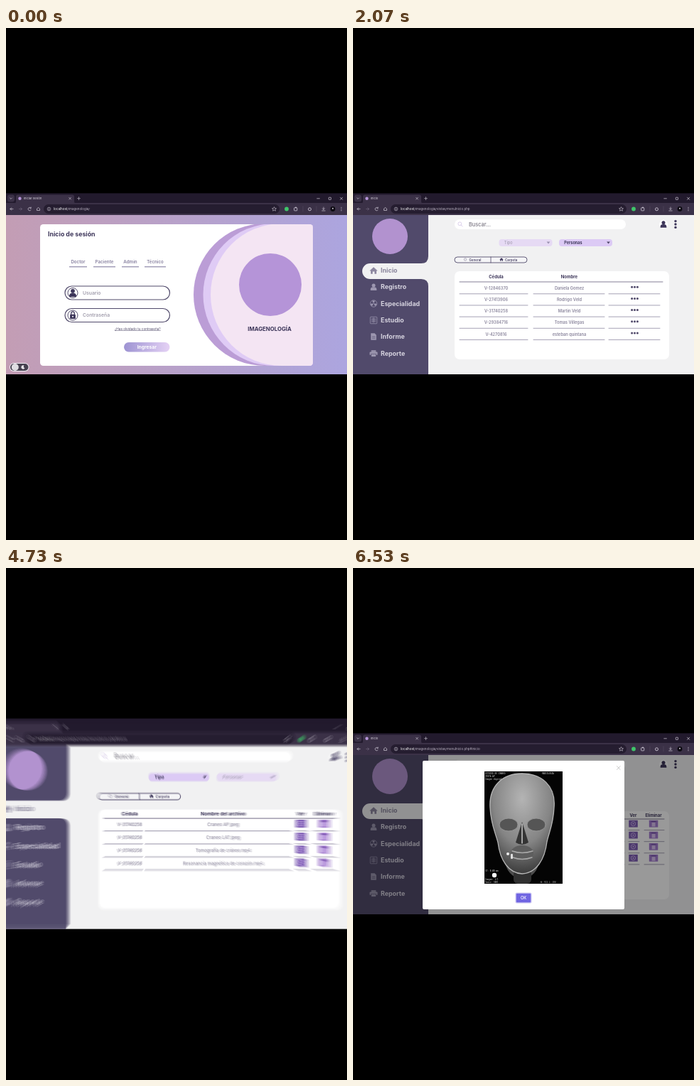
An HTML page for the animation above (7930 ms loop, 480 by 720 pixels).

```html
<!DOCTYPE html>
<html lang="es">
<head>
<meta charset="utf-8">
<title>Imagenología</title>
<style>
  html, body { margin: 0; width: 100%; height: 100%; overflow: hidden; background: #000; }
  svg { display: block; width: 100%; height: 100%; font-family: Inter, sans-serif; }
</style>
</head>
<body>
<svg id="stage" viewBox="0 0 480 720"></svg>
<script>
const INK = '#3d365a', MID = '#514a6b', GREY = '#8a859c', LILAC = '#b594d8';
const TOP = 263, BOTTOM = 487;

// Drawing helpers: every one returns SVG markup
const text = (x, y, s, size, fill, weight = 700, more = '') =>
  `<text x="${x}" y="${y}" font-size="${size}" fill="${fill}" font-weight="${weight}" ${more}>${s}</text>`;
const mid = (x, y, s, size, fill, weight = 700) => text(x, y, s, size, fill, weight, 'text-anchor="middle"');
const box = (x, y, w, h, fill, r = 0, more = '') =>
  `<rect x="${x}" y="${y}" width="${w}" height="${h}" rx="${r}" fill="${fill}" ${more}/>`;
const page = (fill, more) => box(0, TOP, 480, BOTTOM - TOP, fill, 0, more);
const disc = (x, y, r, fill, more = '') => `<circle cx="${x}" cy="${y}" r="${r}" fill="${fill}" ${more}/>`;
const oval = (x, y, rx, ry, fill, more = '') =>
  `<ellipse cx="${x}" cy="${y}" rx="${rx}" ry="${ry}" fill="${fill}" ${more}/>`;
const shape = (d, fill, more = '') => `<path d="${d}" fill="${fill}" ${more}/>`;
const line = (d, color, w = 0.8) => shape(d, 'none', `stroke="${color}" stroke-width="${w}" stroke-linecap="round"`);
const at = (x, y, k, s) => `<g transform="translate(${x} ${y}) scale(${k})">${s}</g>`;

const person = c => disc(0, -2.3, 2.5, c) + shape('M-4.3 4.8V3.2A4.3 3.2 0 0 1 4.3 3.2V4.8Z', c);
const house = c => shape('M0-5 6 .6H4.2V5H1.4V1.5H-1.4V5H-4.2V.6H-6Z', c);
const caret = (x, y, c) => shape(`M${x - 2.4} ${y - 1.3}h4.8l-2.4 3z`, c);
const icons = [
  house,
  person,
  c => disc(0, 0, 5, 'none', `stroke="${c}" stroke-width=".8"`) +
    [0, 120, 240].map(a => shape('M-.8 1.2-2 4A4.3 4.3 0 0 0 2 4L.8 1.2Z', c, `transform="rotate(${a + 60})"`)).join('') + disc(0, 0, .8, c),
  c => box(-5, -5, 10, 10, 'none', 1, `stroke="${c}" stroke-width=".8"`) + line('M0-3.5V3.5M-3-2Q0-3 3-2M-3 0Q0-1 3 0M-3 2Q0 1 3 2', c),
  c => shape('M-4-5H1.5L4-2.5V5H-4Z', c) + line('M-2 0H2M-2 2.3H2', MID, .7),
  c => box(-3.5, -4.5, 7, 2.5, c) + box(-5.8, -2, 11.6, 4.5, c, 1) + box(-3.5, .8, 7, 4.2, c, 0, `stroke="${MID}" stroke-width=".7"`),
];

function browser(title, path) {
  const c = '#cfc9d6';
  return box(0, 232.4, 480, 15, '#221a2d') + box(0, 246, 480, 17, '#3b3147') +
    box(2, 234.5, 10, 10, '#3b3147', 3) + line('M5.6 239 7 240.4 8.4 239', c, .7) +
    shape('M12 247Q14 246 14 244V237Q14 234.5 17 234.5H93Q96 234.5 96 237V244Q96 246 98 247Z', '#3b3147') +
    disc(19.5, 239.8, 2.2, LILAC) + text(25, 241.3, title, 4, '#ddd8e2', 400) +
    line('M88.7 238.3l2.8 2.8m0-2.8l-2.8 2.8M100.5 239.7h4m-2-2v4', c, .6) +
    line('M437.8 239.8h3.6M470.5 238.2l3.2 3.2m0-3.2l-3.2 3.2', c, .7) +
    box(454.3, 238.2, 3.2, 3.2, 'none', .5, `stroke="${c}" stroke-width=".7"`) +
    line('M10 254.5H6m1.8-1.8L6 254.5l1.8 1.8M35 253.2A2.2 2.2 0 1 0 35 256M35.2 252v1.4h-1.4', c, .7) +
    line('M18.5 254.5h4m-1.8-1.8 1.8 1.8-1.8 1.8', '#6e647a', .7) +
    at(45.5, 254.5, .4, shape('M0-5 5-1V5H-5V-1Z', 'none', `stroke="${c}" stroke-width="1.8"`)) +
    box(53, 248, 332, 13, '#251d30', 6.5) +
    disc(60.5, 254.5, 2.3, 'none', `stroke="${c}" stroke-width=".6"`) + line('M60.5 254.4v1.2M60.5 253.2v.1', c, .6) +
    text(67, 256, `<tspan fill="#fff">localhost</tspan>${path}`, 4.5, '#bcb5c4', 400) +
    shape('M377.5 251.6l.9 1.9 2.1.2-1.6 1.4.5 2.1-1.9-1.1-1.9 1.1.5-2.1-1.6-1.4 2.1-.2z', 'none', `stroke="${c}" stroke-width=".6"`) +
    disc(395, 254.5, 2.9, '#3fc66a') +
    box(405.6, 252.7, 4.2, 4.2, 'none', .7, `stroke="${c}" stroke-width=".8"`) + disc(408, 252.4, .9, c) +
    line('M418 251v7M437 251v7', '#5b5067', .5) +
    disc(427.5, 254.8, 2, 'none', `stroke="${c}" stroke-width=".9"`) +
    line('M447 252v3.2m-1.5-1.4 1.5 1.5 1.5-1.5M444.8 257h4.4', c, .7) +
    disc(460, 254.5, 3.4, '#0d0a12') + disc(460, 253.7, 1, c) +
    [252.3, 254.5, 256.7].map(y => disc(472, y, .6, c)).join('');
}

function login() {
  const field = (y, label, icon) =>
    box(83, y - 9.5, 147.5, 19, '#fff', 9.5, `stroke="${MID}" stroke-width="1.2"`) +
    disc(94, y, 7, '#fff', `stroke="${MID}" stroke-width="1"`) + at(94, y, 1.15, icon) +
    text(108, y + 2.2, label, 6.8, '#a19dac', 600);
  const lock = box(-3.4, -1, 6.8, 5.3, INK, .8) + line('M-2-1V-2.5A2 2 0 0 1 2-2.5V-1', INK, 1.1) + disc(0, 1.5, .9, '#fff');
  const roles = [['Doctor', 89, 114], ['Paciente', 123, 154], ['Admin', 163, 187], ['Técnico', 195, 225]];
  return browser('Iniciar Sesión', '/imagenologia/') +
    page('url(#page)') + box(48, 276, 384, 199, '#fff', 4.5) +
    `<g clip-path="url(#card)">${box(264, 275, 260, 200, '#bb9dd6', 100)}` +
    `${box(277.5, 275, 260, 200, '#dfcbf5', 100)}${box(288, 275, 260, 200, '#f4e5f3', 100)}</g>` +
    disc(372, 361, 44, LILAC) + mid(371, 425.5, 'IMAGENOLOGÍA', 7.8, INK) +
    text(59, 293, 'Inicio de sesión', 8.8, INK) +
    roles.map(([s, a, b]) => mid((a + b) / 2, 331.2, s, 6.1, '#928ca8') + box(a, 335.2, b - a, 1.2, '#8d87a8')).join('') +
    field(372.5, 'Usuario', person(INK)) + field(404, 'Contraseña', lock) +
    text(153, 424.5, '¿Has olvidado tu contraseña?', 4.65, MID, 400, 'text-decoration="underline"') +
    box(166, 442, 64.5, 13.5, 'url(#enter)', 6.7) + mid(198.3, 451.2, 'Ingresar', 6.7, '#fff') +
    box(5, 471, 27.5, 12, '#f2eff5', 6) + box(6, 472, 25.5, 10, '#46404f', 5) + disc(12.8, 477, 5, '#e0dee3') +
    shape('M25.5 474.6A2.7 2.7 0 1 0 26.4 478.5 2.4 2.4 0 0 1 25.5 474.6Z', '#e6e4e8');
}

// Sidebar with one highlighted entry that opens into the page
function sidebar(active, top, bottom, rows) {
  const names = ['Inicio', 'Registro', 'Especialidad', 'Estudio', 'Informe', 'Reporte'];
  const r = Math.min(17, (bottom - top) / 2);
  return page('#f1f1f2') +
    shape(`M0 ${TOP}H106V${top - 10}Q106 ${top} 96 ${top}H${13 + r}A${r} ${r} 0 0 0 13 ${top + r}V${bottom - r}` +
      `A${r} ${r} 0 0 0 ${13 + r} ${bottom}H96Q106 ${bottom} 106 ${bottom + 10}V${BOTTOM}H0Z`, MID) +
    disc(52, 293, 25, '#b292cf') +
    names.map((s, i) => at(29, rows[i], i == 1 ? 1 : .95, icons[i](i == active ? '#8d87a0' : '#9d97b0')) +
      text(39, rows[i] + 3.1, s, 8.9, i == active ? GREY : '#d6d3df')).join('');
}

function home(path, byPerson, table) {
  const select = (x, s, on) => box(x, 297, 75, 10, on ? '#dccaf5' : '#e6daf4', 4) +
    text(x + 7.3, 304, s, 5.5, on ? INK : '#a79fb5', on ? 700 : 500) + caret(x + 69.5, 301.8, on ? MID : '#9b92b0');
  return browser('Inicio', path) + sidebar(0, 331, 353, [341, 364.3, 387.5, 411, 434, 457.5]) +
    box(143, 269.3, 241, 13.7, '#fff', 6.8) +
    disc(150.3, 275.3, 2.4, 'none', 'stroke="#d3c5e8" stroke-width=".8"') + line('M152.1 277.1l2 2', '#d3c5e8') +
    text(163, 278.8, 'Buscar...', 7.4, '#7b7783', 500) +
    disc(437, 276, 6, '#fff') + at(437, 276, 1, person(INK)) +
    [271.6, 276, 280.4].map(y => disc(454, y, 1.7, INK)).join('') +
    select(205.5, 'Tipo', !byPerson) + select(290, 'Personas', byPerson) +
    box(143, 322, 102, 8, '#f5f5f7', 4, `stroke="${MID}" stroke-width=".9"`) + line('M194 322v8', MID) +
    disc(158, 325.5, 1.7, 'none', `stroke="${GREY}" stroke-width=".6"`) + text(163.5, 327.6, 'General', 4.5, MID, 600) +
    at(209, 325.5, .45, house(INK)) + text(214, 327.6, 'Carpeta', 4.5, MID, 600) +
    box(143, 342, 302, 124, '#fff', 7) + table;
}

const rules = (y, spans, c, w) => spans.map(([a, b]) => line(`M${a} ${y}H${b}`, c, w)).join('');

function people() {
  const rows = [['V-12846370', 'Daniela Gomez'], ['V-27413906', 'Rodrigo Veld'], ['V-31740258', 'Martin Veld'],
    ['V-29384716', 'Tomas Villegas'], ['V-4270816', 'esteban quintana']];
  const cols = [[150, 246], [254, 354], [360, 432]];
  return home('/imagenologia/vistas/menuInicio.php', true,
    mid(201.5, 352, 'Cédula', 6, INK) + mid(304.5, 352, 'Nombre', 6, INK) + rules(357, [[150, 436]], '#77718c', .9) +
    rows.map(([id, name], i) => {
      const y = 366 + i * 16.15;
      return mid(201.5, y + 2, id, 5.6, GREY, 600) + mid(304.5, y + 2, name, 5.7, GREY, 600) +
        [392.6, 396.5, 400.4].map(x => disc(x, y - 1.7, 1.5, MID)).join('') + rules(y + 7.8, cols, '#8f8aa2', .8);
    }).join(''));
}

function files() {
  const rows = ['Craneo AP.jpeg', 'Craneo LAT.jpeg', 'Tomografía de cráneo.mp4', 'Resonancia magnética de corazón.mp4'];
  const heads = [[182, 'Cédula'], [298, 'Nombre del archivo'], [394.5, 'Ver'], [423, 'Eliminar']];
  return home('/imagenologia/vistas/menuInicio.php#inicio', false,
    heads.map(([x, s]) => mid(x, 349.6, s, 5.9, INK)).join('') + rules(353, [[150, 438]], '#77718c', .9) +
    rows.map((s, i) => {
      const y = 361 + i * 16.1;
      return mid(182, y + 1.6, 'V-31740258', 5.2, GREY, 600) + mid(298, y + 1.6, s, 5.3, GREY, 500) +
        box(388.3, y - 6.3, 12.5, 9.8, '#7d5bb4', .6) + disc(394.5, y - 1.4, 3.1, 'none', 'stroke="#d4bdf0" stroke-width=".9"') + disc(394.5, y - 1.4, 1, '#d4bdf0') +
        box(416.8, y - 6.3, 12.5, 9.8, '#a37bd0', .6) + box(420.7, y - 3, 4.8, 5.4, '#d9c3f0', .5) + line(`M420 ${y - 4.4}h6.2`, '#5f3f94') +
        rules(y + 7.6, [[150, 198], [201, 382], [388, 403], [410, 438]], '#8f8aa2', .8);
    }).join(''));
}

function form() {
  const xs = [185, 269.5, 354];
  const labels = [['Cédula', 'Nombre', 'Apellido'], ['Fecha de nacimiento', 'Edad', 'Teléfono'],
    ['Género', 'Clave'], ['Municipio', 'Parroquia', 'Dirección']];
  const drop = (x, y) => box(x - 2.2, y - 2.8, 4.4, 5.6, '#ececec', .5, 'stroke="#aaa" stroke-width=".4"') + at(x, y, .5, caret(0, 0, '#444'));
  const note = (x, y, s, c = '#555') => text(x, y, s, 4.9, c, 400);
  const entry = (y, s) => line(`M44.2 ${y - 2}h3.4m-1.7-1.7v3.4`, GREY, 1.3) + text(50, y, s, 5.8, GREY);
  let out = browser('Inicio', '/imagenologia/vistas/menuInicio.php#registroPaciente') +
    sidebar(1, 356, 400, [341, 364.5, 409, 432, 455, 479]) +
    entry(378.6, 'Paciente') + entry(389.3, 'Personal') +
    mid(294, 288.8, 'DATOS DEL PACIENTE', 10.8, MID) +
    box(393, 277, 41, 10, '#fff', 1) + note(395, 283.9, '01/08/2024');
  labels.forEach((row, j) => row.forEach((s, i) => {
    const y = 321.3 + j * 34;
    out += text(xs[i], y, s, 5.9, MID) + (s == 'Parroquia' ? box(xs[i], y + 7.5, 71, 10, '#f8f8f9', 1) : box(xs[i], y + 7.5, 60, 10, '#fff', 1));
  }));
  return out + box(197, 328.5, 1.8, 11, '#f1f1f2') + box(372, 362, 1.5, 11, '#f1f1f2') +
    note(187, 335.6, 'V') + drop(193.5, 333.7) + text(192, 369.3, 'dd/mm/aaaa', 5.5, '#333', 400) + box(234, 363.2, 9.5, 2, '#c9b6ea') +
    note(355.5, 369.2, '0414') + drop(369, 367.3) + note(374.5, 369.2, '1234567', '#999') +
    note(187, 403.2, 'Seleccione su genero') + drop(241, 401.5) +
    note(187, 437.3, 'Seleccionar municipio') + drop(241, 435.5) + drop(337.5, 435.5) +
    box(359, 468, 53, 11, 'url(#next)', 5.5) + mid(385.5, 475.4, 'Siguiente', 5, '#fff');
}

function viewer() {
  const mono = (x, y, s) => text(x, y, s, 2.8, '#e4e4e4', 400, 'font-family="Noto Sans Mono, monospace"');
  const scan = box(185, 286, 110, 158, '#040404') +
    oval(238, 410, 24, 27, '#4d4d4d') + box(226, 425, 25, 19, '#303030', 6) +
    shape('M193 337C191 306 211 289 238 289S286 306 283 337C282 361 276 371 273 385 270 410 258 429 238 430 219 429 207 411 204 386 200 371 194 360 193 337Z', 'url(#scan)', 'stroke="#b5b5b5" stroke-width="1.3"') +
    oval(219, 361, 13, 9, '#555', 'stroke="#999" stroke-width=".9"') + oval(258, 361, 13, 9, '#555', 'stroke="#999" stroke-width=".9"') +
    shape('M238 357 247 386Q238 392 229 386Z', '#343434') + line('M238 360V387', '#c4c4c4', 1.6) +
    oval(238, 401, 16, 11, '#5e5e5e') + line('M224 398Q238 403 253 398M225 407Q238 412 252 407', '#aaa', 1.4) +
    disc(218, 402, 2, '#eee') + box(222, 402, 3, 7, '#ddd', 1) + disc(199, 432, 3.2, '#fff') +
    mono(186, 290, 'ESTUDIO DE CRANEO') + mono(186, 294, 'VISTA AP') + mono(266, 290, 'RADIOLOGIA') + mono(186, 298, 'Imagen digital') +
    mono(186, 427, 'ST: 0.00 mm') + mono(186, 439, 'Imagen: 1/1') + mono(186, 443, 'Serie: 1001') + mono(264, 443, 'W: 512 L: 256');
  return files() + page('#000', 'opacity=".4"') +
    box(98, 271, 284, 209, '#fff', 2) + line('M371.4 278.7l4.8 4.8m0-4.8l-4.8 4.8', '#bbb', .8) + scan +
    box(228.5, 456.5, 23, 15, '#c9c4f2', 2) + box(229.8, 457.7, 20.4, 12.6, '#7065e2', 1.4) + mid(240, 466, 'OK', 5.6, '#fff', 500);
}

const fade = (id, a, b) => `<linearGradient id="${id}"><stop stop-color="${a}"/><stop offset="1" stop-color="${b}"/></linearGradient>`;
const scenes = [login, people, form, files, viewer];
const LAYERS = 8;
const stage = document.getElementById('stage');
stage.innerHTML = '<defs>' + fade('page', '#c39db4', '#aca5df') + fade('enter', '#9d93d2', '#e5d2f5') + fade('next', '#c39db9', '#aea4de') +
  `<radialGradient id="scan" cy=".25" r=".75"><stop stop-color="#b4b4b4"/><stop offset=".6" stop-color="#858585"/><stop offset="1" stop-color="#3c3c3c"/></radialGradient>
  <clipPath id="card">${box(48, 276, 384, 199, '#fff', 4.5)}</clipPath>` +
  scenes.map((draw, i) => `<g id="scene${i}">${draw()}</g>`).join('') +
  '</defs>' + box(0, 0, 480, 720, '#000') +
  Array.from({ length: LAYERS }, (_, i) => `<use href="#scene0" opacity="${1 / (i + 1)}"/>`).join('');
const layers = [...stage.querySelectorAll('use')];

// Pull-out transitions: start, cut to the next scene, end
const LOOP = 7930, STEP = 200 / 3;
const moves = [[1599, 1733, 2066], [3066, 3197, 3533], [4533, 4690, 5066], [6066, 6199, 6533]];

const zoom = (t, [start, cut]) => t < cut
  ? 0.998 - 0.25 * ((t - start) / 134) ** 2
  : 1 + 0.83 / (1 + (t - cut) / 60) ** 3;

function draw() {
  const now = performance.now() % LOOP;
  const t = Math.floor((now + 4) / STEP) * STEP;
  const scene = moves.filter(m => t >= m[1]).length;
  const move = moves.find(m => t >= m[0] && t < m[2]);
  layers.forEach((layer, i) => {
    layer.style.display = i && !move ? 'none' : '';
    if (i && !move) return;
    // stacked samples give the radial motion blur
    const late = t + i * 2;
    const s = !move ? 1 : t < move[1] ? zoom(Math.min(late, move[1] - 1), move) : zoom(late, move);
    layer.setAttribute('href', '#scene' + scene);
    layer.setAttribute('transform', `translate(240 360) scale(${s}) translate(-240 -360)`);
  });
  requestAnimationFrame(draw);
}
draw();
</script>
</body>
</html>
```
